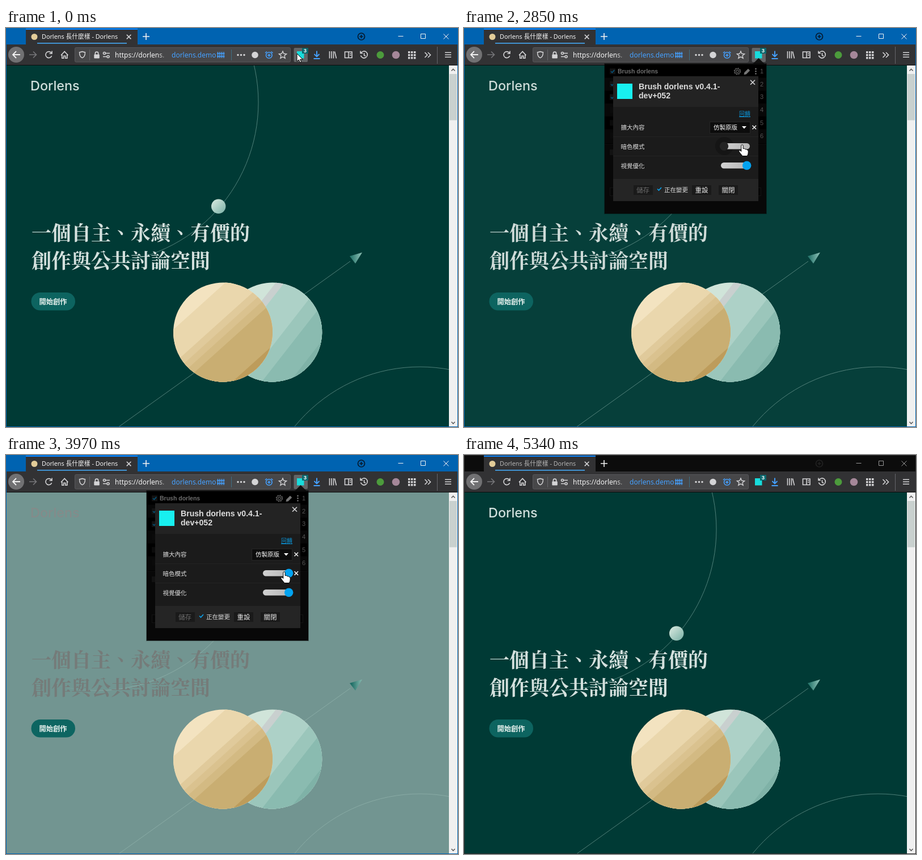
Animation, 797 px wide and 703 px high, one loop 5.42 s. Source, as an HTML page:

```html
<!DOCTYPE html>
<html lang="zh-Hant">
<head>
<meta charset="utf-8">
<title>Theme switch</title>
<style>
html, body { margin: 0; width: 100%; height: 100%; overflow: hidden; background: #003a35; }
svg { display: block; width: 100%; height: 100%; }
text { font-family: "Liberation Sans", "Noto Sans CJK TC", sans-serif; font-size: 10.5px; fill: #ddd; white-space: pre; }
.ui { font-family: "Noto Sans", "Noto Sans CJK TC", sans-serif; }
.head { font-family: "Noto Serif CJK TC", "Noto Serif TC", "Noto Sans CJK TC", serif; font-size: 35px; font-weight: 700; fill: var(--head); }
.logo { font-family: Inter, sans-serif; font-size: 23.4px; font-weight: 500; fill: var(--logo); }
.ic { fill: none; stroke: #d4d4d6; stroke-width: 1.6; }
.fill { fill: #d4d4d6; stroke: none; }
.blue { stroke: #45a1ff; }
.orbit { fill: none; stroke: var(--line); stroke-width: 1; }
.link { fill: #0c95d8; text-decoration: underline; }
.btn { fill: #0c0c0c; stroke: #262626; }
.big { font-size: 11.5px; fill: #eee; }
.b { font-weight: 700; }
</style>
</head>
<body>
<svg id="stage" viewBox="0 0 797 703" xmlns="http://www.w3.org/2000/svg">
<defs>
  <clipPath id="pageClip"><rect x="1" y="66" width="780" height="636"/></clipPath>
  <clipPath id="panelClip"><rect id="panelBox" y="63"/></clipPath>
  <clipPath id="disc"><circle r="87.5"/></clipPath>
  <linearGradient id="fade" gradientUnits="userSpaceOnUse" x1="80" y1="0" x2="190" y2="0">
    <stop offset="0" style="stop-color:var(--line);stop-opacity:0"/><stop offset="1" style="stop-color:var(--line)"/>
  </linearGradient>
  <linearGradient id="moon" x1="0" y1="0" x2="1" y2="1">
    <stop offset=".1" stop-color="#d3e6dc"/><stop offset="1" stop-color="#78b0a5"/>
  </linearGradient>
  <linearGradient id="wing">
    <stop offset=".15" style="stop-color:var(--wingA)"/><stop offset="1" style="stop-color:var(--wingB)"/>
  </linearGradient>
  <linearGradient id="urlFade">
    <stop offset="0" stop-color="#474749" stop-opacity="0"/><stop offset="1" stop-color="#474749"/>
  </linearGradient>
  <linearGradient id="track"><stop offset="0" stop-color="#d2d2d2"/><stop offset="1" stop-color="#b4b4b4"/></linearGradient>
</defs>

<!-- page -->
<g clip-path="url(#pageClip)">
  <rect y="66" width="797" height="637" style="fill:var(--bg)"/>
  <circle class="orbit" cx="161" cy="131" r="284" style="stroke:url(#fade)"/>
  <circle class="orbit" cx="730" cy="882" r="285"/>
  <path class="orbit" d="M199 702.5L607 411"/>
  <circle cx="374.7" cy="314.3" r="12.7" fill="url(#moon)"/>
  <path d="M606 402L628 395.5 616 415Z" fill="url(#wing)"/>
  <g id="planets"></g>
  <text class="logo" x="43" y="110">Dorlens</text>
  <text class="head" x="45" y="373.5">一個自主、永續、有價的</text>
  <text class="head" x="45" y="422.5">創作與公共討論空間</text>
  <rect x="44.5" y="466" width="77.5" height="31.5" rx="15.7" style="fill:var(--btn)"/>
  <text class="b" x="58.5" y="486.5" style="font-size:12.25px;fill:#e9f3f0">開始創作</text>
</g>
<rect x="781" y="66" width="15" height="636" fill="#f0f0f0"/>
<rect x="782" y="81" width="13" height="81.5" fill="#c9d1cf"/>
<path d="M785.5 75.5l3-3.2 3 3.2M785.5 694l3 3.2 3-3.2" fill="none" stroke="#555" stroke-width="1.5"/>

<!-- browser chrome -->
<rect id="title" width="797" height="29"/>
<rect id="frame" x=".5" y=".5" width="796" height="702" fill="none"/>
<rect x="1" y="29" width="795" height="37" fill="#323234"/>
<rect x="35" y="1" width="197" height="29" fill="#323234"/>
<rect x="35" y="1" width="197" height="2" fill="#0a84ff"/>
<rect x="55" y="26" width="158" height="1.6" fill="#45a9f5"/>
<rect x="1" y="65" width="795" height="1" fill="#0c0c0d"/>
<circle cx="50" cy="15.5" r="5.5" fill="#e3cc98"/>
<text id="tab" class="ui" x="63" y="19.3" style="font-size:10.8px">Dorlens 長什麼樣 - Dorlens</text>
<path class="ic" d="M212.8 11.8l7.6 7.6m0-7.6l-7.6 7.6"/>
<path d="M241 15h12M247 9v12" class="ic" style="stroke:#f2f2f2"/>
<g id="ring" fill="none" stroke-width="1.7"><circle cx="626.5" cy="15" r="6"/><path d="M623.5 15h6M626.5 12v6"/></g>
<path id="win" fill="none" d="M691.500 14.500h9M731.500 10.500h8v8h-8zM771.500 10.500l9 9m0-9l-9 9"/>

<circle cx="18" cy="47" r="14" fill="#717173"/>
<path class="ic" style="stroke:#f2f2f2;stroke-width:1.8" d="M25 47H12.500M18 41l-6 6 6 6"/>
<path class="ic" style="stroke:#77777a" d="M41 47h12M48 41.500l5.500 5.500-5.500 5.500"/>
<path class="ic" d="M80 44a5.500 5.500 0 1 0 .6 5M81 40.500v4.500h-4.500"/>
<path class="ic" d="M97 48l6.200-6.500 6.200 6.500M98.800 47v6.200h3v-4h3v4h3V47"/>
<rect x="121.500" y="34.500" width="380" height="25.500" rx="2" fill="#474749" stroke="#58585b"/>
<path class="ic" d="M134.500 41.500c2 1 3.500 1.200 5 1.200 0 5-1.500 8.500-5 10-3.500-1.500-5-5-5-10 1.500 0 3-.2 5-1.200z" style="stroke-width:1.4"/>
<path class="ic" style="stroke:#66666a;stroke-width:1" d="M147.500 38v19M760.500 33v30"/>
<path class="ic" d="M157.300 47v-2.200a2.700 2.700 0 0 1 5.400 0V47"/><rect class="fill" x="155.300" y="46.500" width="9.500" height="7" rx="1"/>
<path class="ic" d="M176 44.500h7M171 50.500h6"/><circle class="ic" cx="173.500" cy="44.500" r="2"/><circle class="ic" cx="180" cy="50.500" r="2"/>
<text class="ui" x="192" y="51.700" style="font-size:12px;fill:#f4f4f4">https://dorlens.</text>
<rect x="268" y="38" width="21" height="19" fill="url(#urlFade)"/>
<text class="ui" x="292" y="51.700" style="font-size:12px;fill:#45a1ff">dorlens.demo</text>
<path class="ic blue" d="M373.500 42v11M377 42v11M380.500 42v11M384 42v11M372 45h13.500M372 50h13.500" style="stroke-width:1.300"/>
<path class="ic" style="stroke:#3f6f86;stroke-width:1" d="M397.500 38v19"/>
<g class="fill"><circle cx="409" cy="47.500" r="1.700"/><circle cx="414.500" cy="47.500" r="1.700"/><circle cx="420" cy="47.500" r="1.700"/><circle cx="439" cy="47.500" r="5.800"/></g>
<path class="ic blue" d="M458.500 48a5.300 5.300 0 1 0 10.600 0 5.300 5.300 0 1 0-10.600 0M461 48h5.600M463.800 45.200v5.600M457 44l3-2.500M470.500 44l-3-2.500"/>
<path class="ic" style="stroke-width:1.400" d="M488 41l1.900 4.300 4.700.4-3.600 3.100 1.100 4.600-4.100-2.500-4.100 2.500 1.100-4.600-3.600-3.100 4.700-.4z"/>
<rect id="hover" x="507.500" y="35" width="24.500" height="25" rx="2" fill="#636567"/>
<rect x="513" y="41" width="12.500" height="12.500" fill="#18dcdc"/>
<rect x="522" y="35" width="11" height="10" fill="#0b686e"/><text class="b" x="524.800" y="43.300" style="font-size:9.500px;fill:#fff">3</text>
<path class="ic blue" style="stroke-width:1.900" d="M548 40.500v9M543.500 46l4.500 4.500 4.500-4.500M542.500 54h11"/>
<path class="ic" d="M570.500 41v12.500M574 41v12.500M577.500 41v12.500M579.500 41.500l3 12"/>
<path class="ic" d="M597.500 42h12.500v10.500h-12.500zM604 42v10.500M606 45h2.500M606 48h2.500"/>
<path class="ic" d="M626 44a6 6 0 1 1-.5 4.500M625 40.500v4h4M631.500 44v4l2.500 1.500"/>
<circle cx="660" cy="47.500" r="6.500" fill="#4c9b3c"/><circle cx="687.500" cy="47.500" r="6.800" fill="#a58799"/>
<g id="grid" class="fill"></g>
<path class="ic" d="M738.500 43l4.500 4.500-4.500 4.500M744 43l4.500 4.500-4.500 4.500"/>
<path class="ic" d="M774 43.300h11M774 47.300h11M774 51.300h11"/>

<!-- extension panel -->
<g id="panel">
  <path d="M509 63.500L519.500 53 530 63.500Z" fill="#111"/>
  <rect id="edge" y="62.500" fill="none" stroke="#000" stroke-opacity=".35"/>
  <g clip-path="url(#panelClip)">
    <rect x="248" y="63" width="286" height="265" fill="#111"/>
    <g id="stripes" fill="#000"></g>
    <path d="M248 203.500h286" stroke="#000"/><path d="M248 204.500h286" stroke="#1d1d1d"/>
    <g id="left">
      <rect x="326" y="214" width="10" height="10" fill="#242424"/><text x="339.500" y="223.500">停用所有樣式</text>
      <text class="link" x="339.500" y="245.300">尋找樣式</text>
      <rect x="389.500" y="237.500" width="10" height="10" fill="#242424"/><path d="M391.500 242.500l2.200 2.300 4-4.500" class="ic" style="stroke:#0aa5f0"/>
      <text x="403" y="246">嵌入</text><text x="339.500" y="268.300">編寫樣式給：</text>
      <text class="link" x="339.500" y="283.300">dorlens.demo/此網址</text>
    </g>
    <g id="right"></g>
    <g id="buttons">
      <rect class="btn" x="326.500" y="294" width="101" height="17.500"/><text class="big" x="336.800" y="306.500">管理已安裝樣式</text>
      <rect class="btn" x="431.500" y="294" width="44" height="17.500"/><text class="big" x="442" y="306.500">選項</text>
      <rect class="btn" x="479.500" y="294" width="44.500" height="17.500"/><text class="big" x="491" y="306.500">Tips</text>
    </g>
    <g id="dialog">
      <rect class="btn" x="257.500" y="281.500" width="266" height="14"/>
      <rect x="248" y="63" width="286" height="265" opacity=".5"/>
      <rect x="263" y="85" width="256" height="220" fill="#1b1b1b"/>
      <rect x="263" y="85" width="256" height="54" fill="#232323"/>
      <rect x="263" y="266" width="256" height="39" fill="#252525"/>
      <path d="M263 191.500h256M263 225.500h256" stroke="#232323"/>
      <rect x="270" y="98" width="27" height="27" fill="#18f0f0"/>
      <text class="b" x="308" y="107.500" style="font-size:14.100px">Brush dorlens v0.4.1-</text>
      <text class="b" x="308" y="124" style="font-size:14.100px">dev+052</text>
      <path class="ic" d="M505 91.800l8 8m0-8l-8 8"/>
      <text class="link" x="485" y="155" style="font-size:10px">回饋</text>
      <text x="276.500" y="179">擴大內容</text><text x="276.500" y="212.500">暗色模式</text><text x="276.500" y="246.500">視覺優化</text>
      <rect class="btn" x="433.500" y="165.500" width="71" height="20"/><text x="440" y="179.300" style="fill:#fff">仿製原版</text>
      <path d="M490 173h8l-4 4.500z" fill="#fff"/><path class="ic" style="stroke:#eee" d="M508.500 171.700l6.600 6.600m0-6.600l-6.600 6.600"/>
      <circle id="halo" cx="459" cy="208" r="16" fill="#151515"/>
      <rect x="453" y="203" width="51" height="10.500" rx="5.200" fill="url(#track)"/>
      <rect x="453" y="237" width="51" height="10.500" rx="5.200" fill="url(#track)"/>
      <circle cx="498.700" cy="242.200" r="7.700" fill="#03a3f0"/><circle id="knob" cy="208.200" r="7.700"/>
      <path id="reset" class="ic" style="stroke:#eee" d="M508.500 205l6.600 6.600m0-6.600l-6.600 6.600"/>
      <g fill="#1a1a1a"><rect x="299" y="277" width="34" height="17"/><rect x="402" y="277" width="34" height="17"/><rect x="449" y="277" width="34" height="17"/></g>
      <text class="big" x="304" y="289.500" style="fill:#6c6c6c">儲存</text>
      <path class="ic" style="stroke:#0aa5f0" d="M341 283.500l2.500 2.500 4.500-5"/>
      <text x="353" y="289.300">正在變更</text><text class="big" x="407.500" y="289.500">重設</text><text class="big" x="454.500" y="289.500">關閉</text>
    </g>
  </g>
</g>

<path id="arrow" d="M0 0v14l3.300-3 2.200 5 2.300-1-2.200-4.800h4.600z" fill="#fff" stroke="#000"/>
<path id="hand" d="M-1.700 9V1.500a1.700 1.700 0 0 1 3.400 0V6.500q3-.8 3.600 1 2.600-.6 3 1.200 2.400-.2 2.400 2V14q0 3-2 5.500H0.500L-5.500 12q-1-2.500 1-2.500 1.500 0 2.800 2z" fill="#fff" stroke="#000"/>
</svg>

<script>
const LOOP = 5420;
const $ = id => document.getElementById(id);
const range = n => [...Array(n).keys()];

// Striped planet: [edge, colour] pairs run across the tilted disc
function planet(x, y, tilt, bands) {
  const rects = bands.map(([v, c]) => `<rect x="-90" y="${v}" width="180" height="180" fill="${c}"/>`);
  return `<g transform="translate(${x} ${y}) rotate(${tilt})" clip-path="url(#disc)">${rects.join('')}</g>`;
}
$('planets').innerHTML =
  planet(469.7, 536, -52, [[-90, '#d0e4d9'], [-49, '#c9d0cf'], [-37, '#add1c7'], [15, '#9bc6bb'], [39, '#8abbb0'], [78, '#7fb2a7']]) +
  planet(382.5, 536, -42, [[-90, '#f3e3c0'], [-62, '#ead7ad'], [-17, '#e0ca9b'], [-5, '#dac28f'], [6, '#d3ba83'], [19, '#c9ae72'], [76, '#bd9c5b']]);

$('grid').innerHTML = range(9).map(i =>
  `<rect x="${709 + i % 3 * 5}" y="${41 + (i / 3 | 0) * 5}" width="3.5" height="3.5"/>`).join('');

const cog = y => `<g class="cog" fill="none" stroke="#bbb" stroke-width="1.2" transform="translate(482 ${y})">
  <circle r="2.200"/><circle r="4.600"/><circle r="5.700" stroke-dasharray="2.200 2.280"/></g>`;
const styles = [
  // name, enabled, has settings
  ['Brush dorlens', 1, 1], ['Brush dorlens demo', 1, 1], ['Reshape Han Types', 1, 1],
  ['Dusk dorlens', 0, 0], ['DuskDorlensSurfaces', 0, 0], ['Norble tryBADGES Dusk', 0, 1]
];
let left = '', right = '';
styles.forEach(([name, on, settings], i) => {
  const y = 76.3 + i * 22.7;
  if (i % 2 === 0) $('stripes').innerHTML += `<rect x="248" y="${y - 11.3}" width="286" height="22.7"/>`;
  left += `<rect x="326" y="${y - 5}" width="10" height="10" fill="${on ? '#242424' : '#151515'}"/>
    <text class="b" x="340" y="${y + 4}" fill-opacity="${on ? 1 : .6}">${name}</text>`;
  if (on) left += `<path class="ic" style="stroke:#0aa5f0" d="M328 ${y}l2.200 2.300 4-4.500"/>`;
  right += (settings ? cog(y) : '') +
    `<path d="M493.500 ${y + 6}l1-4 6.500-6.500 3.200 3.200-6.500 6.500z" fill="#eee"/>` +
    range(3).map(k => `<circle cx="514.500" cy="${y - 4.2 + k * 4.2}" r="1.300" fill="#eee"/>`).join('') +
    `<text x="522" y="${y + 3.7}" style="font-size:11px;fill:#aaa">${i + 1}</text>`;
});
$('left').innerHTML += left;
$('right').innerHTML = right;
const firstCog = document.querySelector('.cog');

const clamp = x => Math.min(1, Math.max(0, x));
const ramp = (t, a, b) => clamp((t - a) / (b - a));
const mix = (a, b, p) => 'rgb(' + [1, 3, 5].map(i => {
  const u = parseInt(a.substr(i, 2), 16), v = parseInt(b.substr(i, 2), 16);
  return Math.round(u + (v - u) * p);
}) + ')';

// CSS "ease": cubic-bezier(.25, .1, .25, 1)
function ease(x) {
  if (x <= 0 || x >= 1) return clamp(x);
  const curve = (s, a, b) => 3 * s * (1 - s) ** 2 * a + 3 * s * s * (1 - s) * b + s ** 3;
  let lo = 0, hi = 1;
  for (let i = 0; i < 24; i++) {
    const mid = (lo + hi) / 2;
    if (curve(mid, .25, .25) < x) lo = mid; else hi = mid;
  }
  return curve(lo, .1, 1);
}

// The page fade advances in short steps, with one longer hold in each direction
function stepTime(t) {
  if (t < 2900) return 2850;
  if (t < 3880) return 2900 + Math.floor((t - 2900) / 30) * 30;
  const s = 3880 + Math.floor((t - 3880) / 30) * 30;
  return s === 4000 ? 3970 : s;
}
function lightness(t) {
  if (t < 2850) return 0;
  const s = stepTime(t);
  return s < 3880 ? ease((s - 2838) / 300) : 1 - ease((s - 3880) / 300);
}

// dark and light values
const theme = {
  bg: ['#003a35', '#ebf5f2'], logo: ['#d0dfdc', '#333333'], head: ['#d4e0dd', '#101010'],
  line: ['#4f7f78', '#c6d9d4'], btn: ['#0d6460', '#0d6763'],
  wingA: ['#2d7a70', '#0f625c'], wingB: ['#93c4b9', '#7db3a8']
};

const show = (id, on) => $(id).setAttribute('display', on ? 'inline' : 'none');
const set = (id, attrs) => { for (const k in attrs) $(id).setAttribute(k, attrs[k]); };

function draw(t) {
  const light = lightness(t);
  for (const k in theme) $('stage').style.setProperty('--' + k, mix(...theme[k], light));

  const idle = ramp(t, 4990, 5090);
  set('title', { fill: mix('#0063b1', '#0c0c0c', idle) });
  set('frame', { stroke: mix('#0063b1', '#2b2b2b', idle) });
  set('ring', { stroke: mix('#06182b', '#222222', idle) });
  set('win', { stroke: mix('#f4f4f4', '#999999', idle) });
  $('tab').style.fill = mix('#f4f4f4', '#b4b4b4', idle);
  show('hover', t < 5100);

  const wide = t >= 2070;
  const box = wide ? { x: 248, width: 285, height: 264 } : { x: 318, width: 215, height: 256.5 };
  set('panel', { opacity: ramp(t, 735, 880) * (1 - ramp(t, 4950, 5130)) });
  show('panel', t >= 750);
  set('panelBox', box);
  set('edge', { x: box.x - .5, width: box.width + 1, height: box.height + 1 });
  set('left', { transform: `translate(${wide ? -69 : 0} 0)` });
  show('buttons', !wide);
  show('dialog', wide);
  set('dialog', { opacity: ramp(t, 2055, 2100) });

  const off = t >= 2850 && t < 3880;
  set('knob', { cx: off ? 458.5 : 498.7, fill: off ? '#242424' : '#03a3f0' });
  show('halo', off);
  show('reset', !off);

  const move = 1 - (1 - ramp(t, 840, 1060)) ** 2;
  const onCog = move > .9 && t < 1820;
  const toggling = t >= 2850 && t < 4210;
  const x = 513 - 27 * move, y = 45 + 32 * move;
  show('arrow', t < 1820 && !onCog);
  show('hand', onCog || toggling);
  set('arrow', { transform: `translate(${x} ${y})` });
  set('hand', { transform: toggling ? 'translate(490.5 206)' : `translate(${x} ${y})` });
  firstCog.setAttribute('stroke', onCog ? '#0aa5f0' : '#bbb');
}

const start = performance.now();
function tick() {
  draw((performance.now() - start) % LOOP);
  requestAnimationFrame(tick);
}
tick();
</script>
</body>
</html>
```
